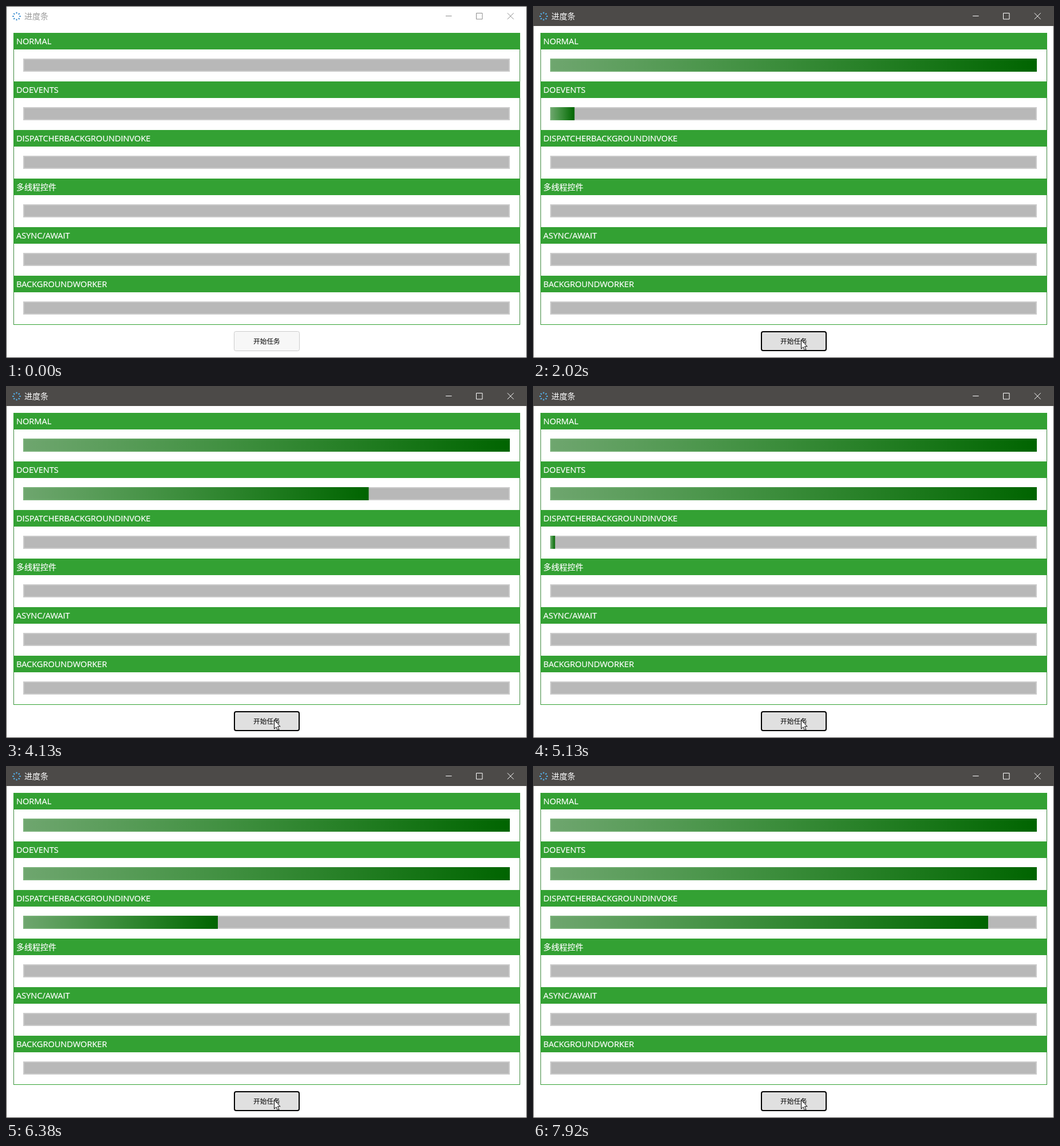
An HTML page that plays this animation: 910x616 px, repeating every 8 s.

```html
<!DOCTYPE html>
<html lang="zh">
<head>
<meta charset="utf-8">
<style>
  html, body { margin: 0; width: 100%; height: 100%; overflow: hidden; background: #fff; }
  svg { display: block; width: 910px; height: 616px; }
  text { font-family: "Open Sans", "Noto Sans CJK SC", "Noto Sans CJK", sans-serif; }
  .cjk { font-family: "Noto Sans CJK SC", "Noto Sans CJK", sans-serif; }
  .head { font-size: 14.55px; fill: #fff; stroke: #fff; stroke-width: .2px; }
  .head.cjk { font-size: 14px; }
  #win { --bar: #fff; --edge: #434343; --ink: #8c8c8c; --title: #999; --icon: #3d8fd1; }
  #win.active { --bar: #4c4a48; --edge: #4c4a48; --ink: #fff; --title: #fff; --icon: #55b4ee; }
  #bar { fill: var(--bar); }
  #edge { fill: none; stroke: var(--edge); }
  #caption { fill: none; stroke: var(--ink); }
  #title { fill: var(--title); font-size: 14px; }
  #icon { stroke: var(--icon); stroke-width: 2; }
</style>
</head>
<body>
<svg id="win" viewBox="0 0 910 616">
  <defs>
    <linearGradient id="fill">
      <stop offset="0" stop-color="#008a00" stop-opacity=".4"/>
      <stop offset="1" stop-color="#006400"/>
    </linearGradient>
  </defs>
  <rect width="910" height="616" fill="#fff"/>
  <rect id="bar" width="910" height="35"/>
  <rect id="edge" x=".5" y=".5" width="909" height="615"/>
  <g id="icon"></g>
  <text id="title" class="cjk" x="32" y="23">进度条</text>
  <path id="caption" d="M768 17.5H778.5M821.5 12.5H832V23H821.5ZM875.8 12.3L886.7 23.2M886.7 12.3L875.8 23.2"/>
  <g id="panel"></g>
  <rect id="button"/>
  <text class="cjk" x="432" y="591" font-size="11.7" font-weight="500">开始任务</text>
  <circle id="click" cx="468" cy="584" r="14" fill="#fff000" fill-opacity=".5"/>
  <path id="cursor" d="M.5 .5V16L4 12.7 6.4 18.3 8.9 17.3 6.5 11.8H11Z" fill="#fff" stroke="#000"/>
</svg>
<script>
const LOOP = 8000, BAR_X = 30, BAR_W = 850, PITCH = 85;
const END = { x: 468, y: 584 }, ENTRY = { x: 698, y: 606 };
const labels = ['NORMAL', 'DOEVENTS', 'DISPATCHERBACKGROUNDINVOKE', '多线程控件', 'ASYNC/AWAIT', 'BACKGROUNDWORKER'];

// Start ms, percent, end ms, percent; ten equal steps each.
// Percent above 100 belongs to the third bar.
const runs = [
  [1870, 1, 2650, 25], [2720, 28, 3510, 52], [3600, 55, 4360, 79],
  [4430, 81.5, 5210, 103.6], [5300, 106, 6080, 131], [6150, 133, 6920, 158],
  [7000, 160, 7770, 184], [7840, 188, 8620, 212]
];

const $ = id => document.getElementById(id);
function set(el, attrs) {
  for (const key in attrs) el.setAttribute(key, attrs[key]);
  return el;
}
function add(parent, tag, attrs) {
  return parent.appendChild(set(document.createElementNS('http://www.w3.org/2000/svg', tag), attrs));
}
const show = (el, on) => { el.style.display = on ? '' : 'none'; };

for (let i = 0; i < 8; i++) {
  add($('icon'), 'path', { d: 'M0 -7.3V-4.7', transform: `translate(18.5 18) rotate(${i * 45})` });
}

const panel = $('panel');
add(panel, 'path', { d: 'M13.5 47V557M897.5 47V557', stroke: '#3f8a3f' });
add(panel, 'path', { d: 'M13 557.5H898', stroke: '#33a133' });
const fills = labels.map((label, i) => {
  const y = 47 + i * PITCH;
  add(panel, 'rect', { x: 13, y, width: 885, height: 29, fill: '#33a133' });
  add(panel, 'text', { x: 18, y: y + 20, class: /[A-Z]/.test(label) ? 'head' : 'head cjk' }).textContent = label;
  add(panel, 'rect', { x: BAR_X, y: y + 45, width: BAR_W, height: 23, fill: '#cacaca' });
  add(panel, 'rect', { x: BAR_X + 2, y: y + 47, width: BAR_W - 4, height: 19, fill: '#b8b8b8' });
  return add(panel, 'rect', { x: BAR_X, y: y + 45, width: 0, height: 23, fill: 'url(#fill)' });
});

function progress(t) {
  const run = runs.filter(r => r[0] <= t).pop();
  if (!run) return 0;
  const [t0, a, t1, b] = run;
  const step = Math.min(10, Math.floor((t - t0 + 5) / (t1 - t0) * 10));
  return Math.floor(a + (b - a) * step / 10 + 1e-6);
}

function cursorAt(t) {
  const step = Math.min(7, Math.floor((t - 70 + 3) / 550 * 7));
  const left = (1 - step / 7) ** 2;
  return {
    x: Math.round(END.x + (ENTRY.x - END.x) * left),
    y: Math.round(END.y + (ENTRY.y - END.y) * left)
  };
}

function drawButton(focused, color) {
  const inset = focused ? 1 : .5;
  set($('button'), {
    x: 398 + inset, y: 569 + inset, width: 115 - 2 * inset, height: 35 - 2 * inset, rx: 3,
    fill: color, stroke: focused ? '#000' : '#ccc', 'stroke-width': inset * 2
  });
}

function draw(t) {
  const active = t >= 1170, pressed = active && t < 1320;
  const pos = cursorAt(Math.max(t, 70));
  const hover = t >= 70 && pos.x < 513 && pos.y < 604;
  $('win').classList.toggle('active', active);
  show($('click'), pressed);
  show($('cursor'), t >= 70);
  set($('cursor'), { transform: `translate(${pos.x} ${pos.y})` });
  drawButton(active, pressed ? '#d8d8d8' : hover ? '#e0e0e0' : '#f7f7f7');

  const total = progress(t);
  const values = [t >= 1870 ? 100 : 0, Math.min(100, total), Math.max(0, total - 100)];
  values.forEach((v, i) => set(fills[i], { width: BAR_W * v / 100 }));
}

const start = performance.now();
function tick() {
  draw((performance.now() - start) % LOOP);
  requestAnimationFrame(tick);
}
tick();
</script>
</body>
</html>
```
